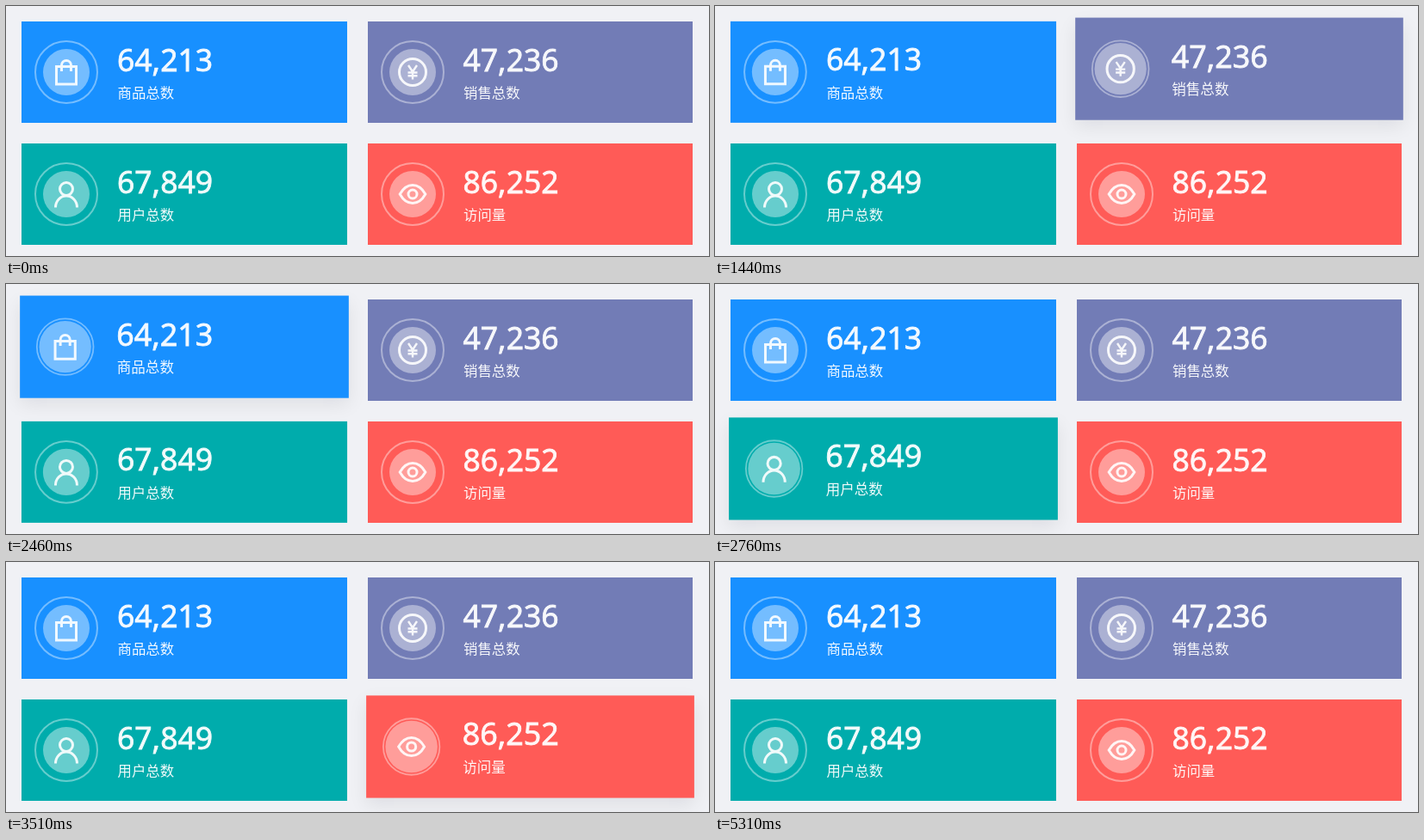
Recreate the animation shown at these times as an HTML page. Size 816 by 291 pixels, loop 5880 ms.

```html
<!DOCTYPE html>
<html lang="zh-CN">
<head>
<meta charset="utf-8">
<title>数据统计</title>
<style>
/* --h is the hover amount of a card: 0 at rest, 1 raised */
@property --h { syntax: "<number>"; inherits: true; initial-value: 0; }

html, body { margin: 0; width: 100%; height: 100%; overflow: hidden; background: #f0f1f5; }
.stage { position: relative; width: 816px; height: 291px; overflow: hidden; }

.card {
  position: absolute; width: 378px; height: 118px;
  animation: 5880ms ease infinite;
  transform: translateY(calc(var(--h) * -4px)) scale(calc(1 + var(--h) * .01));
  box-shadow: 0 8px 20px rgba(0, 0, 30, calc(var(--h) * .08));
}
.goods  { left: 18px;  top: 18px;  background: #1890ff; animation-name: goods; }
.sales  { left: 420px; top: 18px;  background: #727cb6; animation-name: sales; }
.users  { left: 18px;  top: 160px; background: #00acac; animation-name: users; }
.visits { left: 420px; top: 160px; background: #ff5b57; animation-name: visits; }
.sales, .visits { width: 377px; }

svg { position: absolute; left: 0; top: 0; overflow: visible; }
.ring { fill: none; stroke: #fff; stroke-width: 2; opacity: .4; transform: scale(calc(1 - var(--h) * .1)); }
.disc { fill: #fff; opacity: .4; transform: scale(calc(1 + var(--h) * .11)); }
.icon { fill: none; stroke: #fff; stroke-width: 3; opacity: .9; }
text { fill: #fff; }
.num {
  font: 400 35.5px "Noto Sans", "Open Sans", sans-serif;
  stroke: #fff; stroke-width: .8px; opacity: .95;
}
.label { font: 400 16.4px "Noto Sans CJK SC", "Noto Sans CJK", "Noto Sans SC", sans-serif; opacity: .95; }
.sales text, .visits text { transform: translateX(-.5px); }

/* each change takes 300 ms = 5.102% of the loop */
@keyframes sales {
  0%, 6.973% { --h: 0; }
  12.075%, 24.235% { --h: 1; }
  29.337%, 100% { --h: 0; }
}
@keyframes goods {
  0%, 24.235% { --h: 0; }
  29.337%, 41.616% { --h: 1; }
  46.718%, 100% { --h: 0; }
}
@keyframes users {
  0%, 41.616% { --h: 0; }
  46.718%, 52.891% { --h: 1; }
  57.993%, 100% { --h: 0; }
}
@keyframes visits {
  0%, 54.252% { --h: 0; }
  59.354%, 84.014% { --h: 1; }
  89.116%, 100% { --h: 0; }
}
</style>
</head>
<body>
<div class="stage">
  <div class="card goods">
    <svg width="378" height="118">
      <g transform="translate(52 59)">
        <circle class="ring" r="36"/><circle class="disc" r="27"/>
        <path class="icon" d="M-11.5-6.5h23v20.5h-23zM-5.5-1v-7a5.5 5.5 0 0 1 11 0v7"/>
      </g>
      <text class="num" x="111" y="57.5">64,213</text>
      <text class="label" x="111.5" y="89">商品总数</text>
    </svg>
  </div>
  <div class="card sales">
    <svg width="377" height="118">
      <g transform="translate(52 59)">
        <circle class="ring" r="36"/><circle class="disc" r="27"/>
        <g class="icon">
          <circle r="15.5"/>
          <path stroke-width="2.4" style="stroke-width:2.4" d="M-5-8L0-.5 5-8M0-.5V8.5M-5.5.5h11M-5.5 4.3h11"/>
        </g>
      </g>
      <text class="num" x="111" y="57.5">47,236</text>
      <text class="label" x="111.5" y="89">销售总数</text>
    </svg>
  </div>
  <div class="card users">
    <svg width="378" height="118">
      <g transform="translate(52 59)">
        <circle class="ring" r="36"/><circle class="disc" r="27"/>
        <path class="icon" d="M-7.5-6a7.5 7.5 0 1 1 15 0a7.5 7.5 0 1 1-15 0zM-12.5 15.5a12.5 13.5 0 0 1 25 0"/>
      </g>
      <text class="num" x="111" y="57.5">67,849</text>
      <text class="label" x="111.5" y="89">用户总数</text>
    </svg>
  </div>
  <div class="card visits">
    <svg width="377" height="118">
      <g transform="translate(52 59)">
        <circle class="ring" r="36"/><circle class="disc" r="27"/>
        <g class="icon">
          <path d="M-14.8 0C-7-14 7-14 14.8 0C7 14-7 14-14.8 0z"/>
          <circle r="5"/>
        </g>
      </g>
      <text class="num" x="111" y="57.5">86,252</text>
      <text class="label" x="111.5" y="89">访问量</text>
    </svg>
  </div>
</div>
</body>
</html>
```
